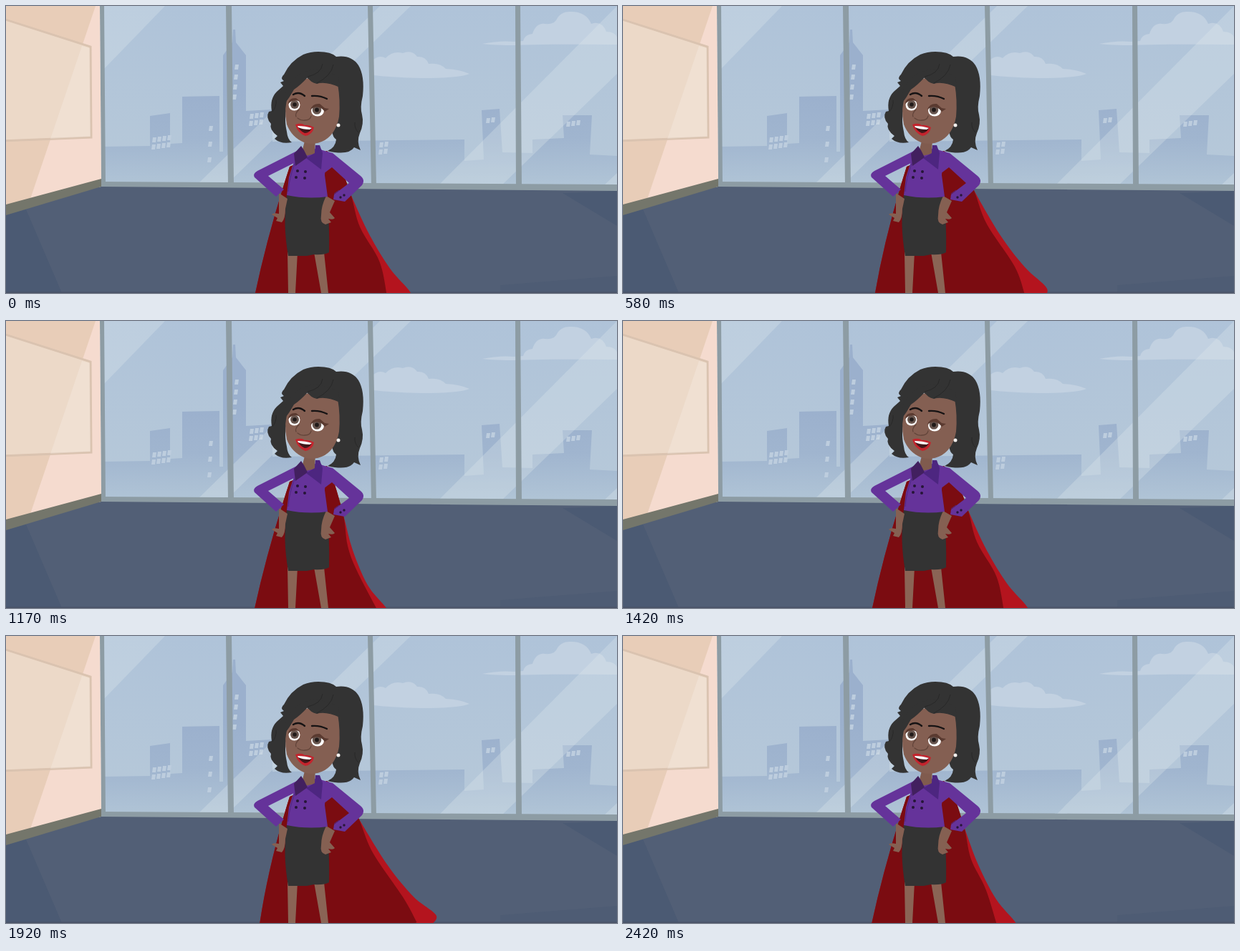
Write an HTML page that moves like this. It is 853 px wide and 402 px high and loops after 2.51 s.

```html
<!DOCTYPE html>
<html lang="en">
<head>
<meta charset="utf-8">
<title>Caped woman in an office</title>
<style>
html, body { margin: 0; width: 100%; height: 100%; overflow: hidden; background: #525f76; }
svg { display: block; width: 100%; height: 100%; }
</style>
</head>
<body>
<svg viewBox="0 0 853 402" preserveAspectRatio="none">
  <defs>
    <linearGradient id="sky" x2="0" y2="1">
      <stop offset="0" stop-color="#afc3d9"/><stop offset="1" stop-color="#b7c9d9"/>
    </linearGradient>
    <linearGradient id="city" gradientUnits="userSpaceOnUse" x1="0" y1="120" x2="0" y2="250">
      <stop offset="0" stop-color="#9bb0cd"/><stop offset=".5" stop-color="#a0b5cf"/><stop offset="1" stop-color="#b0c4d6"/>
    </linearGradient>
  </defs>

  <!-- view through the windows -->
  <rect x="130" width="723" height="262" fill="url(#sky)"/>
  <g fill="#c2d1e1">
    <path d="M513 97V75Q522 68 530 73Q540 62 554 66Q567 61 574 71Q586 70 590 81Q606 79 614 88Q634 89 647 95Q632 101 580 101Q540 100 513 97Z"/>
    <path d="M665 53Q690 48 709 50L722 49Q724 40 735 39Q740 23 753 25Q764 26 768 20Q774 7 789 8Q810 8 817 25Q832 20 838 36Q850 36 853 44V54Q760 53 710 55Q685 55 665 53Z"/>
  </g>
  <path fill="url(#city)" d="M137 197L201 196V154L229 150V193L246 192V127L298 126V204H303V69L316 51L317 33H320L321 51L335 69V147L372 145V190L640 187V217L667 215L664 146L689 144L693 205L735 206V187L779 185L777 153L818 153L815 208L853 210V255H137Z"/>
  <path id="panes" fill="#bdcdde"/>
  <path fill="#dfe9ea" opacity=".3" d="M137 0H222L137 88ZM522 0H565L308 250H267ZM853 0V95L690 253H602ZM853 234V252H834Z"/>
  <g fill="#8d9ca4">
    <path d="M131 0H137L139 250H133ZM307 0H315L318 250H310ZM505 0H512L517 252H510ZM711 0H718L720 254H712Z"/>
    <path d="M132 246L853 250V260L132 254Z"/>
  </g>

  <!-- floor and wall -->
  <path fill="#525f76" d="M0 290L133 253L853 259V402H0Z"/>
  <path fill="#4b5a73" d="M0 292L28 285L78 402H0ZM777 262L853 308V259Z"/>
  <path fill="#4e5c74" d="M690 391L853 378V402H690Z"/>
  <path fill="#485166" d="M0 400.5H853V402H0Z"/>
  <path fill="#f5dbcf" d="M0 0H131L133 243L0 279Z"/>
  <path fill="#e8cdb8" d="M0 0H125L34 270L0 279Z"/>
  <path fill="#ecd9c8" stroke="#dac3b0" stroke-width="3" d="M-4 18L118 57L119 184L-4 189Z"/>
  <path fill="#fff" opacity=".18" d="M106 56L117 59L118 183L62 186Z"/>
  <path fill="#74766b" d="M0 278L133 242V253L0 293Z"/>

  <!-- cape -->
  <path id="lining" fill="#b4141e"/>
  <path id="cape" fill="#7b0c11"/>

  <!-- legs and skirt -->
  <path fill="#8a6455" d="M393 345H407L404 402H394ZM430 345H444L450 402H440Z"/>
  <path fill="#333" d="M392 264L448 265Q452 305 451 345Q444 349 430 348L420 350H394Q386 305 392 264Z"/>

  <!-- hands -->
  <g fill="#856052">
    <path d="M381 262L393 270L390 284Q390 298 385 303L377 301L379 297L371 292Q373 289 381 291L381 278Z"/>
    <path d="M447 266L459 273L452 289L459 297Q457 300 450 298L454 303L446 306Q438 304 440 293Q440 280 447 266Z"/>
  </g>

  <!-- jacket -->
  <g fill="#65339a">
    <path d="M411 200L438 200L447 205L445 237L449 267Q420 271 392 265L395 240L402 218Z"/>
    <path d="M408 202L351 231Q344 235 347 240L377 267L388 257L366 238L402 220Z"/>
    <path d="M438 201L456 206L495 238Q502 244 497 251L473 274L457 271L458 264L479 248L455 226L443 235Z"/>
  </g>
  <path fill="none" stroke="#512681" d="M403 221Q395 242 394 260M458 263L465 258"/>
  <path fill="#805b4e" d="M418 185L432 185L431 207L418 210L414 201Z"/>
  <path fill="#42205f" d="M412 196L402 207L404 224L421 212L416 202Z"/>
  <path fill="#4d2680" d="M432 195L438 195L442 206L440 229L419 213L431 206Z"/>
  <g fill="#261637">
    <circle cx="407" cy="231" r="2"/><circle cx="418" cy="232" r="2"/>
    <circle cx="405" cy="240" r="2"/><circle cx="417" cy="241" r="2"/>
    <circle cx="467" cy="268" r="1.7"/><circle cx="472" cy="265" r="1.7"/>
  </g>

  <!-- head -->
  <path fill="#333" d="M436 64Q454 64 461 71Q482 68 492 83Q501 98 498 126Q494 142 497 152Q500 165 494 178Q489 190 495 202L486 198Q478 210 449 203Q460 198 461 187Q452 182 455 150L420 100L398 125Q386 150 392 176Q393 187 399 191Q384 194 375 186L379 182Q367 173 370 165Q362 156 367 148L371 147Q368 130 378 120L387 112L383 107L388 105Q382 101 388 96Q397 77 415 68Q425 64 436 64Z"/>
  <path fill="#845f52" d="M404 108Q420 96 436 106L463 109Q467 132 465 155Q461 178 445 188Q430 196 416 191Q399 184 392 166Q387 143 395 122Z"/>
  <path fill="#333" d="M389 126Q394 102 418 92Q435 84 464 99L466 114Q446 105 434 109Q425 107 421 100Q411 111 402 117Q396 128 389 137Z"/>
  <path fill="none" stroke="#282828" d="M421 99Q440 95 442 81M434 108Q454 98 457 82M372 148Q378 140 377 132M492 177Q486 171 487 163"/>
  <circle cx="464" cy="167" r="2.5" fill="#f3f0ee"/>
  <path fill="none" stroke="#161314" stroke-linecap="round" stroke-width="2.4" d="M401 124Q409 119 417 126M427 126Q438 125 448 130"/>
  <g fill="#fff"><ellipse cx="402.500" cy="138.500" rx="8" ry="8"/><ellipse cx="435" cy="146.500" rx="9" ry="8"/></g>
  <g fill="#66544d"><circle cx="403" cy="138" r="6"/><circle cx="434" cy="145.500" r="6.300"/></g>
  <g fill="#201a19"><circle cx="403" cy="138" r="2.800"/><circle cx="434" cy="145.500" r="2.900"/></g>
  <path fill="#5a3a30" d="M394 137Q395 128 405 129L411 134Q401 130 394 137ZM425 145Q428 136 438 137L445 143L451 144L445 148Q436 136 425 145Z"/>
  <path fill="none" stroke="#62443a" stroke-width="1.3" stroke-linecap="round" d="M409 145Q403 151 405 155M407 157Q412 161 417 160Q425 160 426 154"/>
  <path fill="#c4242d" d="M404 166Q413 163 417 167Q423 166 430 170Q428 180 418 182Q407 178 404 166Z"/>
  <path fill="#401719" d="M407 168Q418 169 427 171Q424 178 417 178Q410 175 407 168Z"/>
  <path fill="#fff" d="M407 168Q418 168 427 171L424 173Q414 173 408 170Z"/>
</svg>
<script>
const LOOP = 2510, FRAMES = 30, CYCLE = 17, RISE = 7;
const el = id => document.getElementById(id);
const mix = (a, b, u) => a + (b - a) * u;

// how far the wind has lifted the cape: quick eased rise, slow even fall
function liftAt(step) {
  const s = (step + 3) % CYCLE;
  return s < RISE ? (1 - Math.cos(Math.PI * s / RISE)) / 2 : 1 - (s - RISE) / (CYCLE - RISE);
}

// smooth path through points
function curve(pts) {
  let d = 'M' + pts[0];
  for (let i = 0; i < pts.length - 1; i++) {
    const a = pts[i - 1] || pts[i], b = pts[i], c = pts[i + 1], e = pts[i + 2] || c;
    const p = [0, 1].map(k => b[k] + (c[k] - a[k]) / 6);
    const q = [0, 1].map(k => c[k] - (e[k] - b[k]) / 6);
    d += `C${p} ${q} ${c}`;
  }
  return d;
}

function drawCape(step) {
  const lift = liftAt(step), curl = lift ** 4;
  const hem = 347 + 14 * lift ** 3;
  // each point lies between its hanging and its lifted place
  const arm = [mix(471, 498, lift), mix(272, 252, lift)];
  const top = [[448, 203], [mix(457, 479, lift), 223], arm];
  const outer = [
    [mix(484, 545, lift), 321],
    [mix(505, 585, lift), mix(370, 364, lift)],
    [mix(531, 618, lift), mix(402, 376, curl)],
    [mix(537, 604, lift), mix(416, 394, curl)]
  ];
  const inner = [
    [mix(477, 521, lift), mix(315, 301, lift)],
    [mix(490, 571, lift), mix(350, 371, lift)],
    [mix(519, 604, lift ** 2), mix(406, 394, curl)]
  ];
  const close = ([x, y]) =>
    `L${x - 19} ${y + 9}L${hem} 403Q${365 + (hem - 347) * 0.2} 320 396 225Z`;
  el('lining').setAttribute('d', curve([...top, ...outer]) + close(outer[3]));
  el('cape').setAttribute('d', curve([...top, ...inner]) + close(inner[2]));
}

// lit window panes in a slightly slanted grid
function panes(x, y, cols, rows, gap = 10) {
  let d = '';
  for (let c = 0; c < cols; c++)
    for (let r = 0; r < rows; r++)
      d += `M${x + c * 7 - r} ${y + r * gap - c}h5l-1 7h-5z`;
  return d;
}

function drawCity() {
  el('panes').setAttribute('d',
    panes(205, 184, 4, 2) + panes(284, 168, 1, 3, 22) + panes(320, 82, 1, 4, 14) +
    panes(341, 151, 3, 2) + panes(522, 191, 2, 2) + panes(671, 157, 2, 1) + panes(783, 162, 3, 1));
}

const start = performance.now();
function tick() {
  const t = (performance.now() - start) % LOOP;
  let frame = FRAMES - 1;
  while (Math.round(frame * 25 / 3) * 10 > t) frame--;
  drawCape(frame % CYCLE);
  requestAnimationFrame(tick);
}
drawCity();
tick();
</script>
</body>
</html>
```
